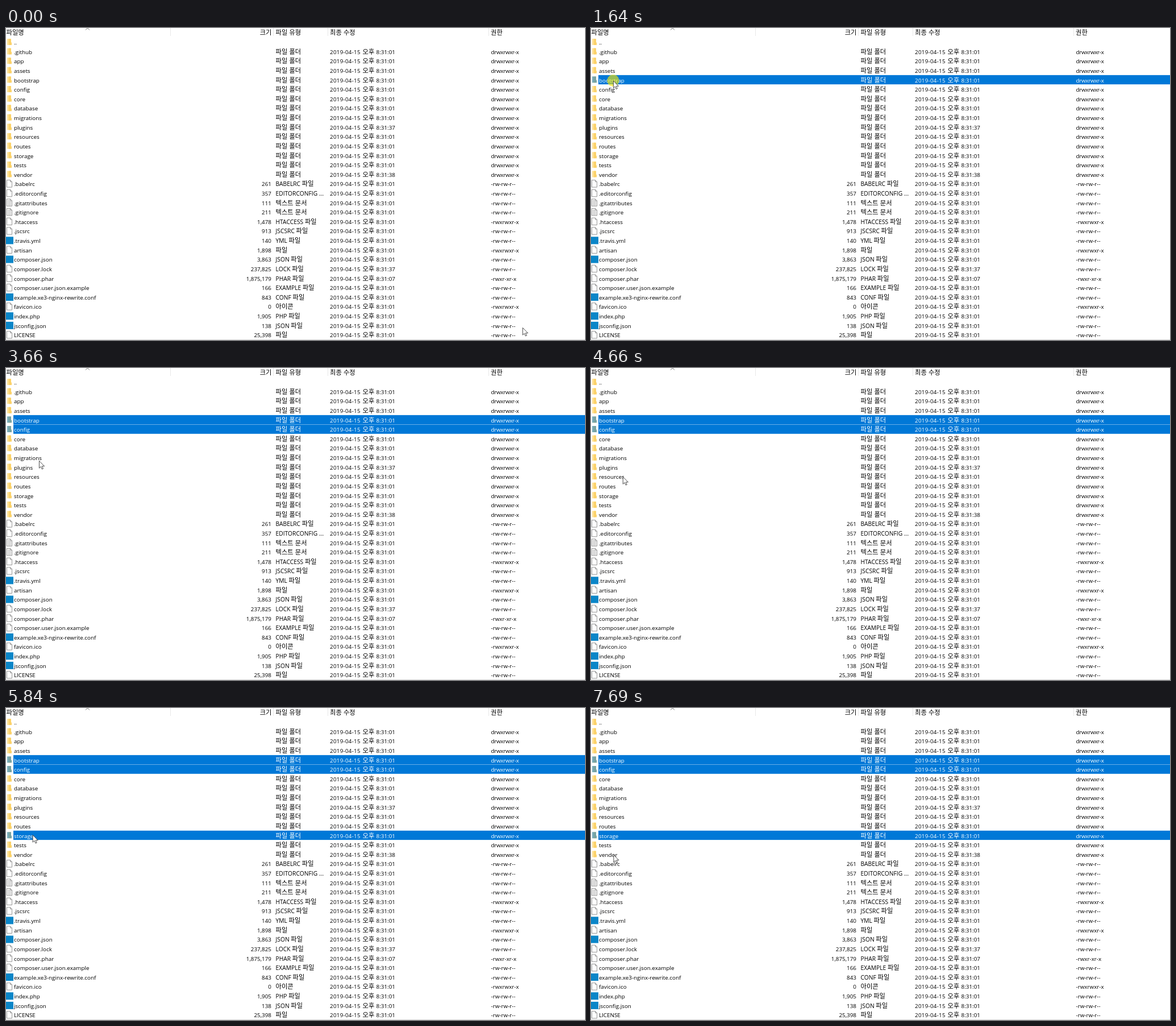
Write an HTML page that moves like this. It is 1019 px wide and 549 px high and loops after 8000 ms.

```html
<!DOCTYPE html>
<html lang="ko">
<head>
<meta charset="utf-8">
<title>File list</title>
<style>
  html, body { margin: 0; width: 100%; height: 100%; overflow: hidden; background: #fff; }
  svg { display: block; width: 1019px; height: 549px; }
  text { font: 9.85px "Open Sans", "Noto Sans", sans-serif; white-space: pre; }
  .type { font-size: 10.3px; }
  .ko { font-family: "Noto Sans CJK KR", "Noto Sans CJK", sans-serif; font-size: 11.3px; font-weight: 350; }
</style>
</head>
<body>
<svg id="stage" viewBox="0 0 1019 549"></svg>
<script>
const LOOP = 8000, PITCH = 16.617, FIRST = 25.4;
const stage = document.getElementById('stage');

const folders = '.github app assets bootstrap config core database migrations plugins resources routes storage tests vendor'
  .split(' ').map(name => ({ name, icon: 'folder', size: '', type: '파일 폴더', perm: 'drwxrwxr-x' }));
const files = `.babelrc|261|BABELRC 파일|page
.editorconfig|357|EDITORCONFIG ...|page
.gitattributes|111|텍스트 문서|lines
.gitignore|211|텍스트 문서|lines
.htaccess|1,478|HTACCESS 파일|page|-rwxrwxr-x
.jscsrc|913|JSCSRC 파일|page
.travis.yml|140|YML 파일|square
artisan|1,898|파일|page|-rwxrwxr-x
composer.json|3,863|JSON 파일|square
composer.lock|237,825|LOCK 파일|page
composer.phar|1,875,179|PHAR 파일|page|-rwxr-xr-x
composer.user.json.example|166|EXAMPLE 파일|page
example.xe3-nginx-rewrite.conf|843|CONF 파일|square
favicon.ico|0|아이콘|page|-rwxrwxr-x
index.php|1,905|PHP 파일|square
jsconfig.json|138|JSON 파일|square
LICENSE|25,398|파일|page`.split('\n').map(line => {
  const [name, size, type, icon, perm = '-rw-rw-r--'] = line.split('|');
  return { name, size, type, icon, perm };
});
const rows = [{ name: '..', icon: 'folder' }, ...folders, ...files];
const seconds = { plugins: '37', vendor: '38', 'composer.lock': '37', 'composer.phar': '07' };

const selectedFrom = { bootstrap: 1640, config: 3190, storage: 5840 };

// Click highlights: [from, to, x, y]
const clicks = [[1550, 1780, 39, 92.5], [3030, 3190, 47, 108.5], [5670, 5840, 46.5, 223.5]];

// Pointer moves: first step, last step, step count, curve control, end
const START = [909, 527];
const moves = [
  [70, 450, 6, [200, 170], [28, 83]],
  [620, 850, 4, [35, 89], [39, 92.5]],
  [1950, 2100, 3, [44, 101], [47, 108]],
  [3350, 3960, 9, [75, 152.5], [38, 215]],
  [4130, 4420, 5, [49, 197], [56, 181]],
  [4590, 5140, 8, [56, 224], [46.7, 223]],
  [7380, 7690, 5, [43, 245], [39.5, 258]]
];

function el(tag, attrs, parent = stage) {
  const node = document.createElementNS('http://www.w3.org/2000/svg', tag);
  for (const key in attrs) node.setAttribute(key, attrs[key]);
  return parent.appendChild(node);
}

// Hangul runs get their own font and size.
function label(str, x, cy, parent, attrs = {}) {
  const node = el('text', { x, y: cy + 3.7, ...attrs }, parent);
  for (const run of str.match(/[가-힣]+( [가-힣]+)*|[^가-힣]+/g) || []) {
    el('tspan', /[가-힣]/.test(run) ? { class: 'ko' } : {}, node).textContent = run;
  }
  return node;
}

const icons = {
  folder(cy, g) {
    el('path', { d: `M2 ${cy - 6.5}h5.5v11h-5.5z`, fill: '#ffe194' }, g);
    el('path', { d: `M5 ${cy - 6.5}h4v6l1 1v4h-5z`, fill: '#fbd26a' }, g);
  },
  page(cy, g) {
    el('path', { d: `M1.5 ${cy - 7}h6l3 3v9.5h-9zM7.5 ${cy - 7}v3h3`, fill: '#fff', stroke: '#8c8c8c', 'stroke-width': .9 }, g);
  },
  lines(cy, g) {
    icons.page(cy, g);
    el('path', { d: [-4, -2, 0, 2, 4].map(d => `M3 ${cy + d - .3}h6`).join(''), stroke: '#b4b4b4' }, g);
  },
  square(cy, g) {
    el('rect', { x: 0, y: cy - 7, width: 13, height: 13, fill: '#0a86c8' }, g);
  }
};

function drawRow(row, i) {
  const cy = FIRST + i * PITCH;
  row.band = el('rect', { x: 13, y: cy - 9, width: 1006, height: 16.3, fill: '#0078d7' });
  icons[row.icon](cy, el('g', {}));
  row.tint = el('path', { d: `M2 ${cy - 6.5}h7v6l1 1v4h-8z`, fill: '#0078d7', opacity: .52 });
  row.texts = el('g', {});
  label(row.name, 14, cy, row.texts);
  if (!row.perm) return;
  label(row.size, 467, cy, row.texts, { 'text-anchor': 'end' });
  label(row.type, 474.5, cy, row.texts, { class: 'type' });
  label('2019-04-15', 570, cy, row.texts, { 'letter-spacing': .25 });
  label('오후', 627.5, cy, row.texts);
  label('8:31:' + (seconds[row.name] || '01'), 685, cy, row.texts, { 'text-anchor': 'end' });
  label(row.perm, 853.5, cy, row.texts, { 'letter-spacing': row.icon === 'folder' ? -.3 : 0 });
}

function drawHeader() {
  const cy = 8.2;
  label('파일명', .5, cy);
  label('크기', 467.5, cy, stage, { 'text-anchor': 'end' });
  label('파일 유형', 474.5, cy);
  label('최종 수정', 570, cy);
  label('권한', 853, cy);
  el('path', { d: 'M289.5 0v14M470.5 0v14M566.5 0v14M849.5 0v14', stroke: '#e8e8e8' });
  el('path', { d: 'M140 3.5L143.5 0L147 3.5', fill: 'none', stroke: '#777' });
  el('path', { d: 'M0 548.5H1019', stroke: '#d9d9d9' });
}

drawHeader();
rows.forEach(drawRow);
const halo = el('circle', { r: 10.6, fill: '#ffeb00', opacity: .6 });
const pointer = el('path', {
  d: 'M.4 .5V13.2L3.3 10.5L5.3 15L7.4 14.1L5.4 9.8H9.5Z',
  fill: '#fff', stroke: '#222', 'stroke-width': .8, 'stroke-linejoin': 'round'
});

function pointerAt(t) {
  let pos = START;
  for (const [from, to, steps, control, end] of moves) {
    if (t < from) break;
    const step = Math.min(steps, 1 + Math.floor((t - from) / (to - from) * (steps - 1) + 1e-6));
    const u = step / steps, v = 1 - u;
    pos = pos.map((p, k) => v * v * p + 2 * u * v * control[k] + u * u * end[k]);
  }
  return pos;
}

function render(t) {
  for (const row of rows) {
    const on = t >= (selectedFrom[row.name] ?? Infinity);
    row.band.style.display = row.tint.style.display = on ? '' : 'none';
    row.texts.setAttribute('fill', on ? '#fff' : '#000');
  }
  const click = clicks.find(([from, to]) => t >= from && t < to);
  halo.style.display = click ? '' : 'none';
  if (click) {
    halo.setAttribute('cx', click[2]);
    halo.setAttribute('cy', click[3]);
  }
  pointer.setAttribute('transform', `translate(${pointerAt(t)})`);
}

const began = performance.now();
function frame() {
  render((performance.now() - began) % LOOP);
  requestAnimationFrame(frame);
}
frame();
</script>
</body>
</html>
```
